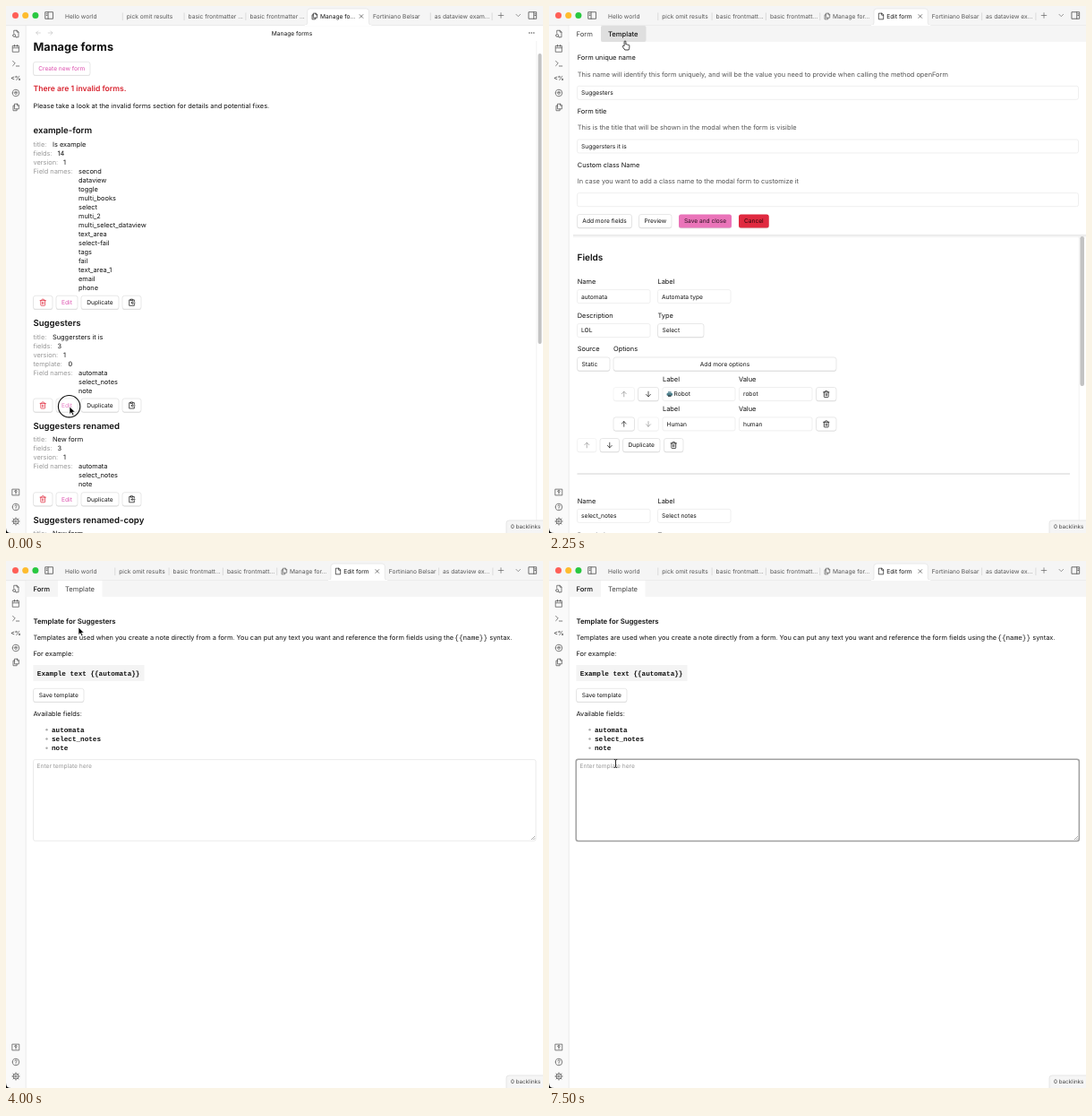
These frames come from a looping animation (600 px wide and 588 px high, 8000 ms). An HTML page:

```html
<!DOCTYPE html>
<html lang="en">
<head>
<meta charset="utf-8">
<title>Form templates</title>
<style>
  html, body { margin: 0; width: 100%; height: 100%; overflow: hidden; background: #fff; }
  svg { display: block; width: 600px; height: 588px; }
  text { font-family: Inter, "Noto Sans", sans-serif; white-space: pre; text-rendering: geometricPrecision; }
  text.mono { font-family: "Liberation Mono", "DejaVu Sans Mono", monospace; }
</style>
</head>
<body>
<svg id="stage" viewBox="0 0 600 588"></svg>
<script>
const INK = '#111', MUTED = '#555', FAINT = '#999', PINK = '#dc4fae', RED = '#e0283c';
const LOOP = 8000, TICK = 125;

const ICONS = {
  trash: 'M3 6h18M19 6v14a2 2 0 0 1-2 2H7a2 2 0 0 1-2-2V6M8 6V4a2 2 0 0 1 2-2h4a2 2 0 0 1 2 2v2M10 11v6M14 11v6',
  up: 'M12 20V4M5 11l7-7 7 7',
  down: 'M12 4v16M5 13l7 7 7-7',
  left: 'M20 12H4M11 5l-7 7 7 7',
  right: 'M4 12h16M13 5l7 7-7 7',
  clip: 'M9 2h6v4H9zM9 4H4v18h16V16M15 4h5v5M22 13H11M15 9l-4 4 4 4',
  file: 'M14 2H4v20h16V8zM14 2v6h6',
  copy: 'M9 2h8l4 4v11H9zM16 2v5h5M9 7H4v15h11v-5',
  close: 'M5 5l14 14M19 5L5 19',
  plus: 'M12 3v18M3 12h18',
  chevron: 'M4 8l8 8 8-8',
  panelLeft: 'M2 3h20v18H2zM9 3v18M4.500 8h2M4.500 12h2',
  panelRight: 'M2 3h20v18H2zM15 3v18M17.500 8h2M17.500 12h2',
  find: 'M6 10V2h9l5 5v15h-7M15 2v5h5M3 17a4 4 0 1 0 8 0a4 4 0 1 0-8 0M10 20l3 3',
  calendar: 'M3 4h18v18H3zM3 10h18M8 1v5M16 1v5',
  prompt: 'M3 5l7 7-7 7M13 20h9',
  face: 'M2 12a10 10 0 1 0 20 0a10 10 0 1 0-20 0M7 10h10M12 7v5M8 14q4 5 8 0',
  vault: 'M2 3h20v18H2zM12 17v-5M9 9a3 3 0 1 0 6 0a3 3 0 1 0-6 0',
  help: 'M2 12a10 10 0 1 0 20 0a10 10 0 1 0-20 0M9 9a3 3 0 1 1 4 3q-1 .5-1 2M12 17v.5',
  gear: 'M4 12a8 8 0 1 0 16 0a8 8 0 1 0-16 0M9 12a3 3 0 1 0 6 0a3 3 0 1 0-6 0M12 1v3M12 20v3M1 12h3M20 12h3M4 4l2.500 2.500M17.500 17.500L20 20M20 4l-2.500 2.500M4 20l2.500-2.500'
};

// y is the middle of the capitals
function text(x, y, str, { size = 7.38, color = INK, weight = 400, anchor = 'start', mono } = {}) {
  return `<text x="${x}" y="${(y + size * .364).toFixed(2)}" font-size="${size}" font-weight="${weight}"
    fill="${color}" text-anchor="${anchor}"${mono ? ' class="mono"' : ''}>${str}</text>`;
}
function rect(x, y, w, h, fill, stroke = 'none', r = 0, sw = .6) {
  return `<rect x="${x}" y="${y}" width="${w}" height="${h}" rx="${r}" fill="${fill}" stroke="${stroke}" stroke-width="${sw}"/>`;
}
function icon(name, x, y, size = 8, color = INK, sw = 2) {
  const k = size / 24;
  return `<path d="${ICONS[name]}" transform="translate(${x - size / 2} ${y - size / 2}) scale(${k})"
    fill="none" stroke="${color}" stroke-width="${sw}" stroke-linecap="round" stroke-linejoin="round"/>`;
}
const line = (x1, y1, x2, y2, color, sw = .7) =>
  `<path d="M${x1} ${y1}L${x2} ${y2}" stroke="${color}" stroke-width="${sw}"/>`;
const group = (id, body) => `<g id="${id}">${body}</g>`;

function box(x, x2, y, fill = '#fff') {
  const w = x2 - x;
  return rect(x, y - 6.8, w, 15, '#dcdcdc', 'none', 2.5) + rect(x, y - 7.5, w, 15, fill, fill === '#fff' ? '#d9d9d9' : 'none', 2.5);
}
const button = (x, x2, y, label, color = INK, fill) =>
  box(x, x2, y, fill) + text((x + x2) / 2, y, label, { size: 6.6, color, anchor: 'middle' });
const iconButton = (x, x2, y, name, color = INK, off) =>
  `<g opacity="${off ? .45 : 1}">${box(x, x2, y) + icon(name, (x + x2) / 2, y, 8.5, color)}</g>`;
const input = (x, x2, y, value = '') =>
  rect(x, y - 7.5, x2 - x, 15, '#fff', '#e4e4e4', 2) + text(x + 4.5, y, value, { size: 6.65 });

function tabs(x0, w, labels, active) {
  return labels.map((label, i) => {
    const x = x0 + i * w, on = i === active;
    const name = /^Manage/.test(label) ? 'copy' : /^Edit/.test(label) ? 'file' : '';
    let out = '';
    if (on) {
      out += `<path d="M${x - 3} 21.600q3 0 3-3V6q0-3 3-3h${w - 6}q3 0 3 3v12.600q0 3 3 3z" fill="#fff" stroke="#dedede" stroke-width=".6"/>`
        + rect(x - 3, 21, w + 6, 1.2, '#fff') + icon('close', x + w - 8.5, 11.5, 6.5, INK);
    } else if (i !== active - 1) {
      out += line(x + w, 7.5, x + w, 16, '#d0d0d0');
    }
    if (name) out += icon(name, x + 8, 11.5, 8, on ? INK : MUTED);
    return out + text(x + (name ? 14.3 : 4.5), 11.7, label, { size: 6.65, color: on ? INK : MUTED });
  }).join('');
}

function chrome() {
  const ribbon = { find: 31, calendar: 47.5, prompt: 64, face: 97, copy: 113, vault: 542.5, help: 559, gear: 575 };
  return rect(0, 0, 600, 21.5, '#f5f5f5') + rect(0, 21.5, 22, 567, '#fafafa')
    + line(0, 21.6, 600, 21.6, '#e0e0e0', .6) + line(22.2, 21.5, 22.2, 588, '#e2e2e2')
    + ['#ff5f57', '#febc2e', '#28c840'].map((c, i) => `<circle cx="${10.5 + i * 11.2}" cy="10.500" r="3.500" fill="${c}"/>`).join('')
    + icon('panelLeft', 48.3, 10.5, 10, MUTED) + icon('plus', 553, 10.5, 7.5, MUTED)
    + icon('chevron', 572.3, 10.5, 7, MUTED) + icon('panelRight', 588.5, 10.5, 10, MUTED)
    + Object.entries(ribbon).map(([name, y]) => icon(name, 11, y, 9, MUTED)).join('')
    + text(11, 80.3, '&lt;%', { size: 7, weight: 600, color: MUTED, anchor: 'middle' });
}

function formCard(y, name, props, fields) {
  const valueX = { title: 52, fields: 57.5, version: 64, template: 69.5 };
  const grey = { color: FAINT };
  let out = text(30.5, y, name, { size: 9.6, weight: 600 });
  y += 15.4;
  for (const [key, value] of Object.entries(props)) {
    out += text(30.5, y, key + ':', grey) + text(valueX[key], y, value);
    y += 10;
  }
  out += text(30.5, y, 'Field names:', grey);
  fields.forEach((f, i) => out += text(81, y + i * 9.98, f));
  y += (fields.length - 1) * 9.98 + 16.6;
  out += iconButton(30.5, 52, y, 'trash', RED) + button(56, 80, y, 'Edit', PINK)
    + button(84, 126, y, 'Duplicate') + iconButton(130, 151, y, 'clip');
  return { out, next: y + 22.8 };
}

function manageView() {
  const some = ['automata', 'select_notes', 'note'];
  const cards = [
    ['example-form', { title: 'Is example', fields: 14, version: 1 },
      ('second dataview toggle multi_books select multi_2 multi_select_dataview text_area '
        + 'select-fail tags fail text_area_1 email phone').split(' ')],
    ['Suggesters', { title: 'Suggersters it is', fields: 3, version: 1, template: 0 }, some],
    ['Suggesters renamed', { title: 'New form', fields: 3, version: 1 }, some],
    ['Suggesters renamed-copy', { title: 'New form', fields: 3, version: 1 }, some]
  ];
  let y = 139;
  const list = cards.map(c => {
    const card = formCard(y, ...c);
    y = card.next;
    return card.out;
  }).join('');
  return icon('left', 36, 30, 7, '#bbb') + icon('right', 49.5, 30, 7, '#bbb')
    + text(319.5, 30.2, 'Manage forms', { size: 6.65, anchor: 'middle' })
    + [584.8, 587.3, 589.8].map(x => `<circle cx="${x}" cy="30" r=".8" fill="${MUTED}"/>`).join('')
    + text(30.5, 45.6, 'Manage forms', { size: 12.7, weight: 700 })
    + button(30.5, 94, 69.9, 'Create new form', PINK)
    + text(30.5, 92, 'There are 1 invalid forms.', { size: 8.6, weight: 600, color: '#d8232f' })
    + text(30.5, 111, 'Please take a look at the invalid forms section for details and potential fixes.')
    + list + line(592.7, 39, 592.7, 588, '#ececec') + rect(594.5, 53, 4, 324, '#c3c3c3', 'none', 2);
}

function subTabs(active) {
  const name = (x, str, on) => text(x, 30.8, str, { size: 7.6, weight: on ? 400 : 500, color: on ? '#444' : '#111' });
  return rect(22.5, 21.9, 577.5, 18, '#f5f5f5')
    + (active ? rect(58, 21.9, 49.5, 18.1, '#fff') : rect(22.6, 21.9, 35.4, 18.1, '#fff'))
    + `<rect class="hover" x="58" y="21.900" width="50.500" height="18" rx="2" fill="#dfdfdf"/>`
    + name(30.5, 'Form', !active) + name(66, 'Template', active);
}

function optionRow(y, label, value, first) {
  const robot = first ? rect(131.5, 431.5, 6.5, 3.6, '#4d7f8c', 'none', 1.6) + rect(133, 430, 3.5, 2, '#7fa4ae')
    + rect(133, 434.3, 3.5, 1.6, '#39474c') : '';
  return text(127, y - 17, 'Label') + text(212, y - 17, 'Value')
    + iconButton(72, 95.5, y, 'up', INK, first) + iconButton(99.5, 122.5, y, 'down', INK, !first)
    + input(127, 208, y) + robot + text(first ? 139.5 : 131.5, y, label, { size: 6.65 })
    + input(212.5, 294, y, value) + iconButton(298.5, 321, y, 'trash');
}

function editView() {
  const top = [
    ['Form unique name', 'This name will identify this form uniquely, and will be the value you need to provide when calling the method openForm', 'Suggesters'],
    ['Form title', 'This is the title that will be shown in the modal when the form is visible', 'Suggersters it is'],
    ['Custom class Name', 'In case you want to add a class name to the modal form to customize it', '']
  ].map(([label, hint, value], i) => {
    const y = 57.6 + i * 59.7;
    return text(31.8, y, label) + text(31.8, y + 18.3, hint, { color: MUTED }) + input(31.5, 591.5, y + 39.2, value);
  }).join('');
  const pair = (y, a, b) => text(31.8, y, 'Name') + text(121.5, y, 'Label')
    + input(31.5, 113, y + 16.6, a) + input(121.5, 203, y + 16.6, b);
  return subTabs(0) + top
    + button(31.5, 92.5, 240, 'Add more fields') + button(100.5, 137, 240, 'Preview')
    + button(145, 204, 240, 'Save and close', '#2a101f', '#ea74b9')
    + button(212, 245.7, 240, 'Cancel', '#2a0508', '#e02a40')
    + rect(27, 255, 573, 4, 'url(#shade)')
    + text(31.5, 280, 'Fields', { size: 10, weight: 600 })
    + pair(307.5, 'automata', 'Automata type')
    + text(31.8, 345, 'Description') + text(121.5, 345, 'Type') + input(31.5, 113, 362, 'LOL')
    + box(121.5, 173, 362) + text(126.5, 362, 'Select', { size: 6.65 })
    + text(31.8, 382.5, 'Source') + text(72, 382.5, 'Options')
    + box(31.5, 68, 399.5) + text(36.5, 399.5, 'Static', { size: 6.65 })
    + button(72, 321, 399.5, 'Add more options')
    + optionRow(433, 'Robot', 'robot', true) + optionRow(466.4, 'Human', 'human', false)
    + iconButton(31.5, 53, 490, 'up', INK, true) + iconButton(57, 78.5, 490, 'down')
    + button(82.5, 124, 490, 'Duplicate') + iconButton(128.5, 150, 490, 'trash')
    + line(31.5, 522, 582, 522, '#cfcfcf', .9)
    + pair(552.3, 'select_notes', 'Select notes')
    + text(31.8, 590, 'Description') + text(121.5, 590, 'Type')
    + line(592.2, 257, 592.2, 588, '#ececec') + rect(593.4, 257, 4.6, 167, '#c3c3c3', 'none', 2.2);
}

function templateView() {
  const code = (x, y, str, weight) => text(x, y, str, { size: 7.65, weight, mono: true });
  return subTabs(1)
    + text(30.5, 67, 'Template for Suggesters', { size: 7.75, weight: 600 })
    + text(30.5, 85.6, 'Templates are used when you create a note directly from a form. You can put any text you want and reference the form fields using the')
    + code(501.3, 85.6, '{{name}}', 400) + text(540.3, 85.6, 'syntax.')
    + text(30.5, 103.6, 'For example:')
    + rect(30.5, 116, 124, 18, '#f4f4f4') + code(34.8, 125.3, 'Example text {{automata}}', 700)
    + button(30.5, 87, 149.8, 'Save template') + text(30.5, 170.4, 'Available fields:')
    + ['automata', 'select_notes', 'note'].map((f, i) =>
      `<circle cx="45.500" cy="${188.2 + i * 10.3}" r="1.200" fill="#aaa"/>` + code(51, 188 + i * 10.3, f, 700)).join('')
    + rect(30.5, 221.6, 561.5, 90.6, '#fff', '#dedede', 2)
    + group('focus', rect(30.2, 221.2, 562.2, 91.4, 'none', '#a2a2a2', 2.5, 1.5))
    + text(34.5, 228.6, 'Enter template here', { size: 6.65, color: '#999' })
    + line(587, 311, 591, 307, '#777', .6) + line(589.3, 311, 591, 309.3, '#777', .6)
    + group('caret', line(35.2, 224.5, 35.2, 232, '#222', .8));
}

const pointers = group('arrow', `<path d="M0 0v8.400l2-1.800 1.400 3.200 1.500-.7-1.400-3.100h2.700z" fill="#000" stroke="#fff" stroke-width=".6"/>`)
  + group('beam', `<path d="M-1.700-4.500Q0-4.500 0-3.500Q0-4.500 1.700-4.500M0-3.500V3.500M-1.700 4.500Q0 4.500 0 3.500Q0 4.500 1.700 4.500" fill="none" stroke="#111" stroke-width=".9"/>`)
  + group('hand', `<path d="M-.9 5.500V.9q0-.9.9-.9t.9.900V4q.7-.6 1.300.1.800-.5 1.300.3 1.200-.3 1.300.8v2q0 1.400-.8 2.800H-.2L-2.700 6.500q-.2-1.100.8-1.100z" fill="#fff" stroke="#111" stroke-width=".8" stroke-linejoin="round"/>`);

const PERSON = 'Fortiniano Belsar';
const wide = ['Hello world', 'pick omit results', 'basic frontmatter ...', 'basic frontmatter ...'];
const narrow = ['Hello world', 'pick omit results', 'basic frontmatt...', 'basic frontmatt...'];

const stage = document.getElementById('stage');
stage.innerHTML = `<defs><linearGradient id="shade" x2="0" y2="1">
    <stop stop-color="#000" stop-opacity=".1"/><stop offset="1" stop-color="#000" stop-opacity="0"/></linearGradient></defs>`
  + rect(0, 0, 600, 588, '#fff') + chrome()
  + group('tabsManage', tabs(61.5, 68.8, [...wide, 'Manage fo...', PERSON, 'as dataview exam...'], 4))
  + group('tabsOpening', tabs(61.5, 68.6, [...wide, 'Manage forms', PERSON, 'as dataview exam...'], -1))
  + group('tabsEdit', tabs(61.5, 60.3, [...narrow, 'Manage for...', 'Edit form', PERSON, 'as dataview ex...'], 5))
  + group('manage', manageView()) + group('edit', editView()) + group('template', templateView())
  + `<path d="M559 589V577q0-3 3-3h39v15z" fill="#f5f5f5" stroke="#dedede" stroke-width=".7"/>`
  + text(564, 581.2, '0 backlinks', { size: 6.2, color: '#444' })
  + `<path d="M0 582.500V588H5.500Q0 588 0 582.500z" fill="#000"/>`
  + group('cursor', `<circle id="ring" cx="-.4" cy="-.3" r="12.200" fill="#fff" fill-opacity=".25" stroke="#111" stroke-width="1.100"/>` + pointers);

// [tick, x, y]
const PATH = [
  [0, 71, 447], [4, 71, 447], [6, 55, 362], [7, 53, 292], [8, 62, 225], [9, 80, 170], [10, 96, 142],
  [11, 101, 152], [13, 102, 118], [15, 95, 74], [17, 86, 42], [18, 85, 39], [20, 86, 40], [22, 83, 38],
  [31, 83, 38], [32, 81, 74], [34, 112, 108], [35, 121, 122], [36, 112, 135], [38, 79, 139],
  [40, 66, 150], [42, 50, 167], [43, 54.5, 172], [45, 67, 182], [48, 73, 198], [50, 74, 215],
  [52, 74, 215], [53, 74.5, 222], [54, 74.5, 226], [64, 74.5, 226]
];

function cursorAt(tick) {
  const i = Math.max(1, PATH.findIndex(p => p[0] >= tick));
  const [t0, x0, y0] = PATH[i - 1], [t1, x1, y1] = PATH[i];
  const k = (tick - t0) / (t1 - t0);
  return [x0 + (x1 - x0) * k, y0 + (y1 - y0) * k];
}

const el = id => document.getElementById(id);
const show = (node, on) => { node.style.display = on ? '' : 'none'; };
const hovers = document.querySelectorAll('.hover');

function render(ms) {
  const tick = Math.floor(ms / TICK);
  const view = tick < 2 ? 'manage' : tick < 26 ? 'edit' : 'template';
  const bar = tick < 2 ? 'tabsManage' : tick < 3 ? 'tabsOpening' : 'tabsEdit';
  const onTab = tick >= 17 && tick < 32;
  const pointer = onTab ? 'hand' : tick === 11 || tick >= 53 ? 'beam' : 'arrow';
  for (const id of ['manage', 'edit', 'template']) show(el(id), id === view);
  for (const id of ['tabsManage', 'tabsOpening', 'tabsEdit']) show(el(id), id === bar);
  for (const id of ['arrow', 'beam', 'hand']) show(el(id), id === pointer);
  hovers.forEach(h => show(h, onTab));
  show(el('ring'), tick === 0 || tick === 24);
  show(el('caret'), tick >= 56 && tick < 60);
  el('focus').style.opacity = Math.min(1, Math.max(0, (tick - 54) / 3));
  el('cursor').setAttribute('transform', `translate(${cursorAt(tick)})`);
}

const start = performance.now();
function loop() {
  render((performance.now() - start) % LOOP);
  requestAnimationFrame(loop);
}
loop();
</script>
</body>
</html>
```
